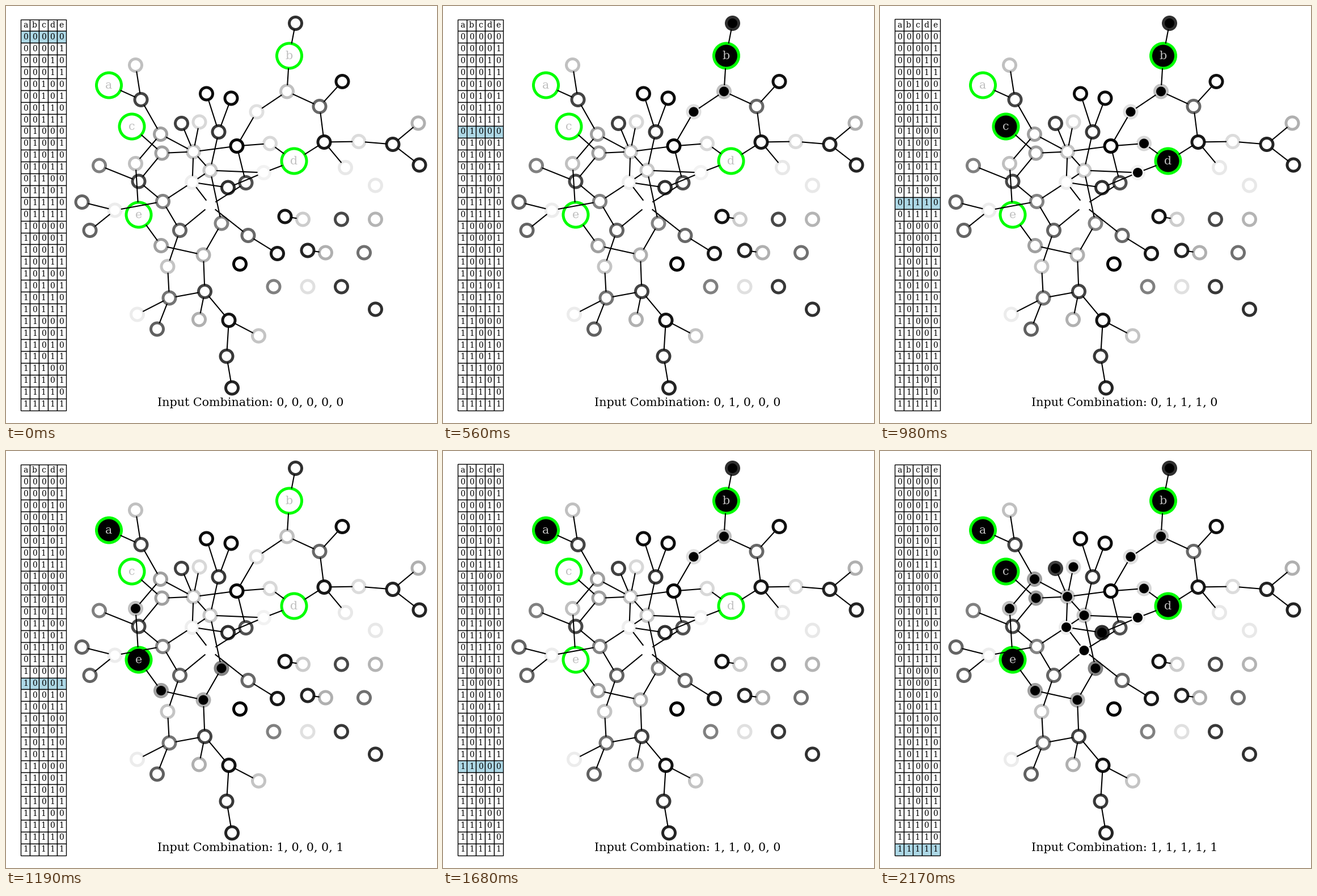
A matplotlib script for the animation above (2240 ms loop, 760 by 737 pixels).

```python
from itertools import product
from math import hypot

import matplotlib.pyplot as plt
from matplotlib.animation import FuncAnimation
from matplotlib.collections import LineCollection

W, H, DPI = 760, 737, 100
INPUTS = "abcde"
R_SMALL, R_INPUT = 11, 22
plt.rcParams["font.family"] = "DejaVu Serif"

# Each region: node keys, then (x, y, ring grey); a light ring is a low threshold.
REGIONS = [
    ("abcde", [(181.5, 140, 0), (499.5, 88, 0), (222, 213, 0), (508, 274, 0),
               (234, 369, 0)]),
    ("fghijklmnopq", [
        (228.5, 104.5, 0xC0), (238, 165.5, 0x44), (272.5, 226.5, 0xA0),
        (228.5, 278.5, 0xC0), (275, 260, 0xA0), (330.5, 257.5, 0xC4),
        (309.5, 207.5, 0x40), (341, 205, 0xD8), (360, 290.5, 0xC8),
        (375, 222.5, 0x38), (353.5, 155, 0x0C), (397, 163, 0x0C)]),
    ("rstuvwxyzABCDE", [
        (407, 247.5, 0x08), (465.5, 243, 0xD8), (454.5, 294.5, 0xF2),
        (442, 187, 0xE0), (495.5, 151, 0xC0), (510.5, 30.5, 0x30),
        (553, 177.5, 0x68), (593, 133.5, 0x10), (561, 240.5, 0x18),
        (622, 239.5, 0xDC), (598.5, 285.5, 0xE8), (682, 244.5, 0x24),
        (727, 207, 0xB0), (729, 281, 0x24)]),
    ("FGHIJKLMNOPQR", [
        (423, 312.5, 0x50), (391.5, 321, 0x30), (328.5, 311.5, 0xEE),
        (360, 352.5, 0xFF), (276.5, 345.5, 0x84), (234, 310, 0x48),
        (164.5, 282, 0x80), (192, 361, 0xEC), (134, 346.5, 0x64),
        (148, 396.5, 0x64), (306.5, 396.5, 0x64), (427, 405.5, 0x68),
        (478.5, 437.5, 0x18)]),
    ("STUVWXYZ01234", [
        (380, 384, 0x84), (348, 440, 0xB0), (273.5, 423.5, 0xA0),
        (285, 460.5, 0xC4), (288, 516, 0x74), (231.5, 545, 0xEC),
        (266.5, 571, 0x60), (350.5, 504.5, 0x44), (340.5, 554, 0xB0),
        (393, 555.5, 0x14), (445.5, 583, 0xC4), (389, 619, 0x38),
        (398.5, 675, 0x24)]),
    ("5678!#$%&*+=?", [
        (492, 372, 0x14), (523.5, 377, 0xCC), (532, 432, 0x24), (563.5, 436, 0xB0),
        (412.5, 456, 0x00), (591.5, 377, 0x48), (651.5, 317, 0xE8),
        (651.5, 377, 0xB4), (631.5, 436, 0x70), (472, 496, 0x80), (532, 496, 0xE0),
        (591.5, 496, 0x38), (651.5, 536, 0x30)]),
]
# Walks through the graph, one key per node.
PATHS = ("agf ghkjc hieUTSnon jKJHIP KL JPVWZT JMN MO knHk lkm krsdt ntGH poq "
         "rFIQR ruvbw vxy xzd BzACD CE XWY 0Z12 134 56 78").split()

nodes = {k: v for keys, vals in REGIONS for k, v in zip(keys, vals)}
near = {k: set() for k in nodes}
for path in PATHS:
    for p, q in zip(path, path[1:]):
        near[p].add(q)
        near[q].add(p)


def cascade(bits):
    """Spread from the switched-on inputs until no node changes."""
    on = {k for k, bit in zip(INPUTS, bits) if bit}
    while True:
        new = set()
        for k, (_, _, grey) in nodes.items():
            hits = len(near[k] & on)
            if k in on or k in INPUTS or not hits:
                continue
            if hits / len(near[k]) >= 1 - grey / 255:
                new.add(k)
        if not new:
            return on
        on |= new


def edge(p, q):
    """Line between two nodes, stopping at their circles."""
    (x0, y0, _), (x1, y1, _) = nodes[p], nodes[q]
    length = hypot(x1 - x0, y1 - y0)
    ux, uy = (x1 - x0) / length, (y1 - y0) / length
    r0, r1 = (R_INPUT if k in INPUTS else R_SMALL for k in (p, q))
    return (x0 + r0 * ux, y0 + r0 * uy), (x1 - r1 * ux, y1 - r1 * uy)


combos = list(product((0, 1), repeat=len(INPUTS)))
states = [cascade(bits) for bits in combos]

fig = plt.figure(figsize=(W / DPI, H / DPI), dpi=DPI, facecolor="white")
ax = fig.add_axes([0, 0, 1, 1])
ax.set_xlim(0, W)
ax.set_ylim(H, 0)
ax.axis("off")


def draw_nodes(keys, radius, rings):
    xs, ys = zip(*(nodes[k][:2] for k in keys))
    return ax.scatter(xs, ys, s=(2 * radius * 72 / DPI) ** 2, c="white",
                      edgecolors=rings, linewidths=3.6, zorder=1)


small = [k for k in nodes if k not in INPUTS]
groups = [
    (small, draw_nodes(small, R_SMALL, [(nodes[k][2] / 255,) * 3 for k in small])),
    (INPUTS, draw_nodes(INPUTS, R_INPUT, "lime")),
]
edges = [edge(p, q) for p in near for q in near[p] if p < q]
ax.add_collection(LineCollection(edges, colors="black", linewidths=1.5,
                                 capstyle="butt", zorder=2))
for k in INPUTS:
    ax.text(*nodes[k][:2], k, size=14.9, color="silver", ha="center", va="center",
            zorder=3)

left, right, top, bottom = 26.5, 105.7, 23.5, 714.7
table = ax.table(
    cellText=[list(INPUTS)] + [[str(b) for b in bits] for bits in combos],
    cellLoc="center",
    bbox=[left / W, 1 - bottom / H, (right - left) / W, (bottom - top) / H])
table.auto_set_font_size(False)
table.set_fontsize(10)

caption = ax.text(431, 707, "", size=14.9, ha="center", va="baseline")


def update(i):
    for keys, dots in groups:
        dots.set_facecolor(["black" if k in states[i] else "white" for k in keys])
    for (row, _), cell in table.get_celld().items():
        cell.set_facecolor("lightblue" if row == i + 1 else "white")
    caption.set_text("Input Combination: " + ", ".join(map(str, combos[i])))
    return []


anim = FuncAnimation(fig, update, frames=len(combos), interval=70,
                     repeat=True, repeat_delay=0)
plt.show()
```
